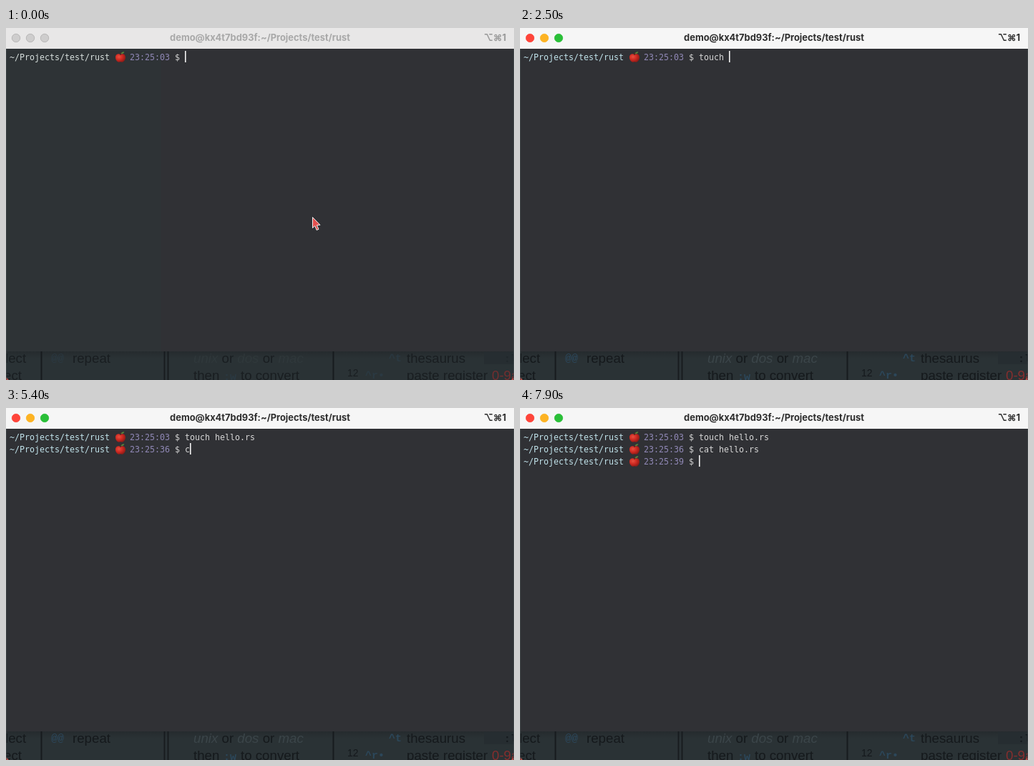
An HTML page that plays this animation: 710 px wide and 492 px high, repeating every 8 s.

```html
<!DOCTYPE html>
<html lang="en">
<head>
<meta charset="utf-8">
<title>Terminal</title>
<style>
  html, body { margin: 0; width: 100%; height: 100%; overflow: hidden; background: #303135; }
  svg { display: block; width: 100vw; height: 100vh; }
  text { white-space: pre; }
  .bar { font: 700 12.9px Inter, "DejaVu Sans", sans-serif; }
  .term { font: 11.63px "DejaVu Sans Mono", monospace; }
  .sheet { font: 18.7px "Liberation Sans", sans-serif; fill: #15191c; }
  .option { font-style: italic; fill: #3b4549; }
  .key { font: 700 15px "Liberation Mono", monospace; fill: #2c475a; }
</style>
</head>
<body>
<svg viewBox="0 0 710 492" xmlns="http://www.w3.org/2000/svg">
  <defs>
    <linearGradient id="shade" x2="0" y2="1">
      <stop offset="0" stop-color="#252b2e"/>
      <stop offset=".25" stop-color="#2a3235"/>
      <stop offset="1" stop-color="#2a3235"/>
    </linearGradient>
    <radialGradient id="skin" cx=".35" cy=".35" r=".7">
      <stop offset="0" stop-color="#e8503f"/>
      <stop offset=".5" stop-color="#cf2a22"/>
      <stop offset="1" stop-color="#8e1a16"/>
    </radialGradient>
    <g id="apple">
      <path d="M0-4C-2-5.600-7-5-7 0C-7 4-4 7-2 6.700Q0 6 2 6.700C4 7 7 4 7 0C7-5 2-5.600 0-4Z" fill="url(#skin)"/>
      <path d="M0-3Q0-6 1-7" fill="none" stroke="#4b2f20" stroke-width="1.200"/>
      <path d="M.5-5Q2-8.500 5.500-7.500Q4-4.500 .5-5Z" fill="#5a8a3c"/>
    </g>
  </defs>

  <rect width="710" height="492" fill="#303135"/>
  <rect id="tint" y="28" width="217" height="424" fill="#2e3336"/>

  <g id="strip">
    <rect y="452" width="710" height="40" fill="url(#shade)"/>
    <rect x="668" y="453" width="42" height="17" fill="#262d31"/>
    <path d="M49.500 452V492M457.500 452V492" stroke="#171b1e" stroke-width="2"/>
    <path d="M221.500 452V492M226.500 452V492" stroke="#171b1e" stroke-width="1.800"/>
    <g class="sheet" id="words">
      <text x="-1" y="468">lect</text>
      <text x="-3" y="492">ect</text>
      <text x="93" y="468">repeat</text>
      <text x="262" y="468"><tspan class="option">unix</tspan> or <tspan class="option">dos</tspan> or <tspan class="option">mac</tspan></text>
      <text x="262" y="492">then</text>
      <text x="328" y="492">to convert</text>
      <text x="560" y="468">thesaurus</text>
      <text x="560" y="492">paste register</text>
      <text x="679" y="492" fill="#842e2e">0-9a</text>
      <text x="477" y="487" style="font-size:14px">12</text>
    </g>
    <g class="key" id="keys">
      <text x="63" y="466">@@</text>
      <text x="304" y="492">:w</text>
      <text x="535" y="466">^t</text>
      <text x="502" y="490">^r•</text>
      <text x="696" y="467" fill="#151a1e">:l</text>
    </g>
    <path d="M0 488L4 492H0ZM710 488L706 492H710Z" fill="#c0504a"/>
  </g>

  <path d="M.5 29V492M709.500 29V492" stroke="#434a4d" stroke-opacity=".7"/>
  <rect id="titleBar" width="710" height="29"/>
  <g id="lights"></g>
  <text class="bar" id="title" x="355" y="18" text-anchor="middle">demo@kx4t7bd93f:~/Projects/test/rust</text>
  <text class="bar" id="shortcut" x="699" y="18" text-anchor="end">⌥⌘1</text>

  <g class="term" id="lines"></g>
  <rect id="caret" width="1.600" height="16" fill="#f2f2f2"/>
  <path id="pointer" d="M428.500 264.500V279.500L431.800 276.600L434.200 282.500L437 281.300L434.500 275.600L439 275.300Z" fill="#e4504f" stroke="#eee" stroke-linejoin="round"/>
</svg>

<script>
const LOOP = 8000, FOCUS = 500, HIDE_POINTER = 1000, SETTLE = 1500;
const CELL = 7, LINE = 17, INPUT_X = 250;
const $ = id => document.getElementById(id);

function add(parent, tag, attrs, text = "") {
  const node = document.createElementNS("http://www.w3.org/2000/svg", tag);
  for (const name in attrs) node.setAttribute(name, attrs[name]);
  node.textContent = text;
  return parent.appendChild(node);
}

// Each burst types its characters at an even pace from its start.
const prompts = [
  { clock: "23:25:03", shown: 0, bursts: [["touc", 1000, 120], ["h ", 1550, 200], ["hello", 2700, 120], [".rs", 3450, 120]] },
  { clock: "23:25:36", shown: 4100, bursts: [["cat ", 5300, 150], ["he", 6050, 150], ["llo.rs", 6400, 100]] },
  { clock: "23:25:39", shown: 7200, bursts: [] }
];

const lights = ["#fe453a", "#fdb323", "#2abf38"].map((color, i) => ({
  color,
  node: add($("lights"), "circle", { cx: 14 + 20 * i, cy: 14, r: 5.7 })
}));

prompts.forEach((prompt, row) => {
  const y = 44.5 + LINE * row;
  prompt.group = add($("lines"), "g", {});
  prompt.path = add(prompt.group, "text", { x: 5, y }, "~/Projects/test/rust");
  add(prompt.group, "use", { href: "#apple", transform: `translate(160 ${y - 3.5})` });
  add(prompt.group, "text", { x: 173, y, fill: "#9088b6" }, prompt.clock);
  add(prompt.group, "text", { x: 236, y, fill: "#d4d4d4" }, "$");
  prompt.input = add(prompt.group, "text", { x: INPUT_X, y, fill: "#d8d8d8" });
});

const typed = (bursts, t) => bursts.map(([text, start, pace]) =>
  text.slice(0, Math.max(0, Math.floor((t - start) / pace) + 1))).join("");

const show = (node, visible) => node.setAttribute("visibility", visible ? "visible" : "hidden");

function draw(t) {
  const focused = t >= FOCUS;
  const sharp = Math.min(1, Math.max(0, (t - FOCUS) / (SETTLE - FOCUS)));

  $("titleBar").setAttribute("fill", focused ? "#f6f6f6" : "#e8e7e7");
  $("title").setAttribute("fill", focused ? "#2d2d2d" : "#a8a8a8");
  $("shortcut").setAttribute("fill", focused ? "#2d2d2d" : "#989898");
  for (const { node, color } of lights) {
    node.setAttribute("fill", focused ? color : "#cecdcd");
    node.setAttribute("stroke", focused ? color : "#b9b8b8");
    node.setAttribute("stroke-width", focused ? .8 : 1);
  }

  $("tint").setAttribute("opacity", 1 - sharp);
  $("words").setAttribute("opacity", .8 + .2 * sharp);
  $("keys").setAttribute("opacity", .35 + .65 * sharp);
  document.querySelectorAll(".option").forEach(node =>
    node.setAttribute("fill-opacity", .4 + .6 * sharp));
  show($("pointer"), t < HIDE_POINTER);

  prompts.forEach((prompt, row) => {
    const visible = t >= prompt.shown;
    show(prompt.group, visible);
    if (!visible) return;
    const text = typed(prompt.bursts, t);
    prompt.input.textContent = text;
    prompt.path.setAttribute("fill", t < SETTLE ? "#d8e0de" : "#c2e4ec");
    $("caret").setAttribute("x", INPUT_X + CELL * text.length);
    $("caret").setAttribute("y", 32 + LINE * row);
  });
}

const origin = performance.now();
function tick() {
  draw((performance.now() - origin) % LOOP);
  requestAnimationFrame(tick);
}
tick();
</script>
</body>
</html>
```
